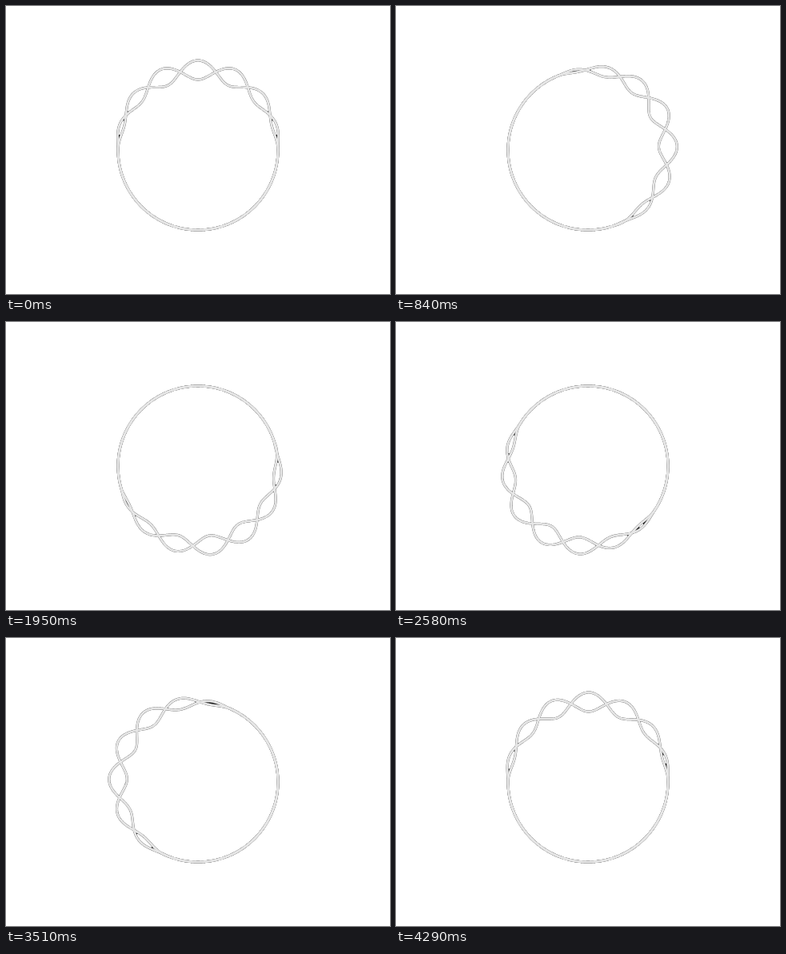
These frames come from a looping animation (480 by 360 pixels, 4320 ms). An HTML page with a canvas:

```html
<!DOCTYPE html>
<html lang="en">
<head>
<meta charset="utf-8">
<title>Braided ring</title>
<style>
  html, body { margin: 0; width: 100%; height: 100%; overflow: hidden; background: #fff; }
  canvas { display: block; width: 480px; height: 360px; }
</style>
</head>
<body>
<canvas id="stage" width="480" height="360"></canvas>
<script>
const ctx = document.getElementById('stage').getContext('2d');
const TAU = Math.PI * 2;
const LOOP = 4320, STEP = 30;
const CX = 240, CY = 180, RADIUS = 100, AMP = 12, WAVES = 7;
const SAMPLES = 720;
const NARROW = 2.3;

// Offset from the ring; angles run clockwise from the top.
function offset(a, p) {
  const envelope = Math.max(0, Math.cos(a - TAU * p));
  return AMP * envelope * Math.cos(WAVES * a + 3 * Math.PI * p);
}

function point(a, r) {
  return [CX + r * Math.sin(a), CY - r * Math.cos(a)];
}

function strand(p, sign) {
  const path = new Path2D();
  for (let i = 0; i < SAMPLES; i++) {
    const a = TAU * i / SAMPLES;
    path.lineTo(...point(a, RADIUS + sign * offset(a, p)));
  }
  path.closePath();
  return path;
}

// Dark slivers where the two strands almost touch.
function slivers(p) {
  const path = new Path2D();
  for (let i = 0; i < SAMPLES; i++) {
    const a = TAU * i / SAMPLES, b = TAU * (i + 1) / SAMPLES;
    const da = Math.abs(offset(a, p)), db = Math.abs(offset(b, p));
    if (Math.max(da, db) > NARROW || da + db === 0) continue;
    path.moveTo(...point(a, RADIUS + da));
    path.lineTo(...point(b, RADIUS + db));
    path.lineTo(...point(b, RADIUS - db));
    path.lineTo(...point(a, RADIUS - da));
    path.closePath();
  }
  return path;
}

function strokeAll(paths, color, width) {
  ctx.strokeStyle = color;
  ctx.lineWidth = width;
  for (const path of paths) ctx.stroke(path);
}

function draw(p) {
  ctx.fillStyle = '#fff';
  ctx.fillRect(0, 0, 480, 360);
  const strands = [strand(p, 1), strand(p, -1)];
  ctx.fillStyle = '#111';
  ctx.fill(slivers(p));
  strokeAll(strands, '#555', 3.1);
  strokeAll(strands, '#e6e6e6', 2.7);
}

const start = performance.now();
function tick() {
  const t = (performance.now() - start) % LOOP;
  draw(Math.floor(t / STEP) * STEP / LOOP);
  requestAnimationFrame(tick);
}
tick();
</script>
</body>
</html>
```
